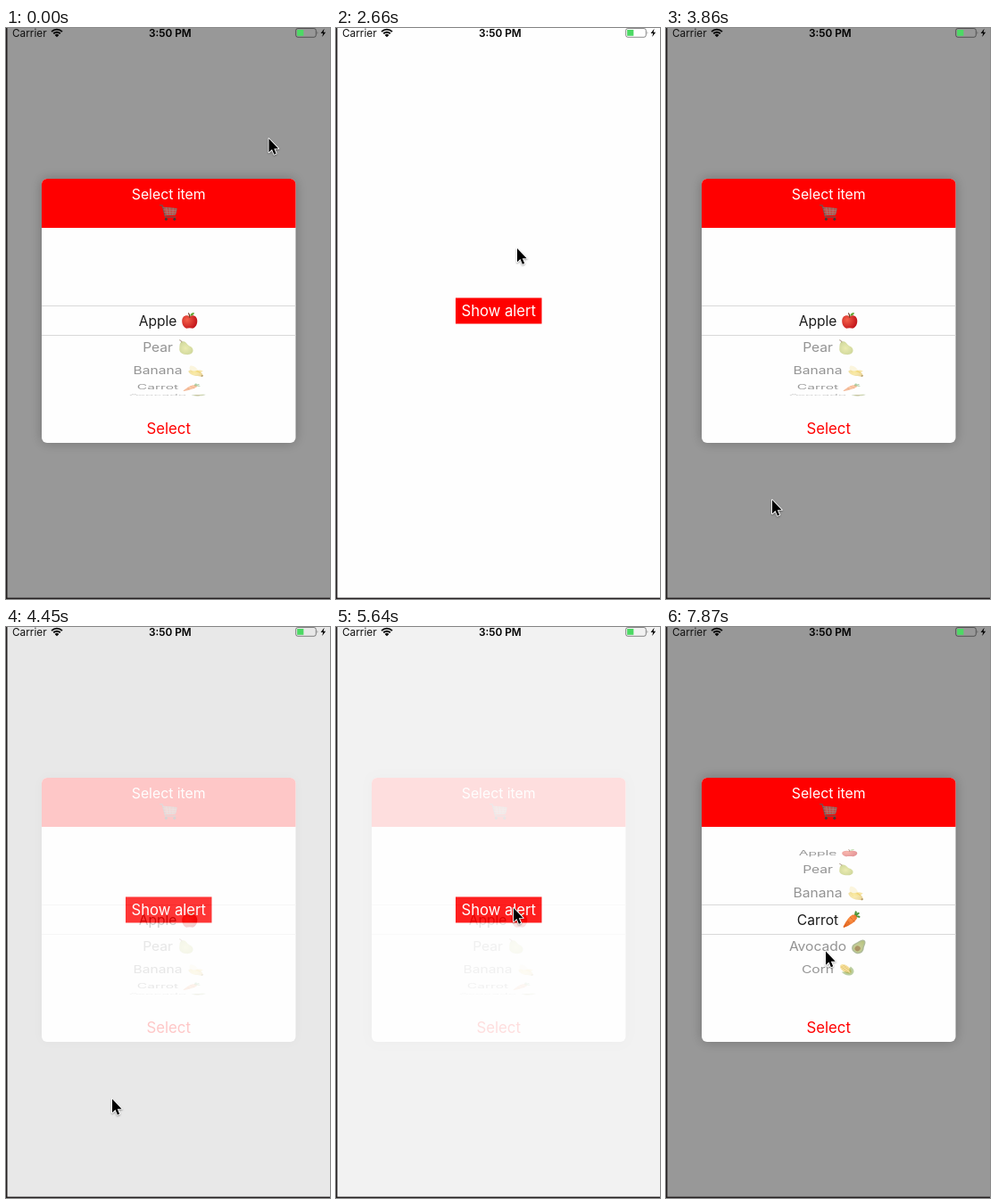
Animation of 363x640 px, one loop 8000 ms. Source, as an HTML page with a canvas:

```html
<!DOCTYPE html>
<html lang="en">
<head>
<meta charset="utf-8">
<title>Item picker alert</title>
<style>
  html, body { margin: 0; width: 100%; height: 100%; overflow: hidden; background: #fefefe; }
  canvas { display: block; width: 100%; height: 100%; }
</style>
</head>
<body>
<canvas id="stage"></canvas>
<script>
const W = 363, H = 640, LOOP = 8000, STEP = 148.5;
const CX = 182.2, WHEEL_Y = 328, RADIUS = 84, PITCH = 0.366;
const RED = '#ff0000';
const ratio = window.devicePixelRatio || 1;

function prepare(canvas) {
  canvas.width = Math.round(W * ratio);
  canvas.height = Math.round(H * ratio);
  const c = canvas.getContext('2d');
  c.scale(ratio, ratio);
  return c;
}
const stage = prepare(document.getElementById('stage'));
const layer = document.createElement('canvas');
const alertCtx = prepare(layer);

// Keys are [step, value, ...]; values between keys are linear.
const FADE = [[0, 1], [11, 1], [12, .87], [13, .45], [14, 0], [18, 0], [19, .1], [20, .5],
  [21, .905], [22, 1], [27, 1], [28, .87], [29, .53], [30, .21], [31, 0], [37, 0],
  [38, .12], [39, .52], [40, .9], [41, 1]];
const POINTER = [[0, 294, 123.5], [3, 277.5, 107.5], [15, 277.5, 107.5], [18, 165, 316],
  [21, 165, 316], [23, 134, 446], [26, 118.5, 528.5], [31, 118.5, 528.5], [35, 198.5, 305],
  [36, 198.5, 314.5], [42, 198.5, 314.5], [43, 179.5, 319], [50, 179, 223], [53, 178.5, 363]];
const SCROLL = [[0, 0], [43, 0], [50, 2.85], [51, 3]];

function valueAt(keys, k) {
  const i = keys.findIndex(key => key[0] > k);
  if (i < 0) return keys[keys.length - 1].slice(1);
  const a = keys[i - 1], b = keys[i];
  const p = (k - a[0]) / (b[0] - a[0]);
  return a.slice(1).map((v, n) => v + (b[n + 1] - v) * p);
}

function setFont(c, size, weight = 400) {
  c.font = `${weight} ${size}px Inter, "Open Sans", sans-serif`;
}

function label(c, text, x, y, size, color, align = 'center', weight = 400) {
  setFont(c, size, weight);
  c.fillStyle = color;
  c.textAlign = align;
  c.fillText(text, x, y);
}

function fill(c, d, color) {
  c.fillStyle = color;
  c.fill(new Path2D(d));
}

function line(c, d, color, width) {
  c.strokeStyle = color;
  c.lineWidth = width;
  c.lineCap = c.lineJoin = 'round';
  c.stroke(new Path2D(d));
}

function oval(c, x, y, rx, ry, turn, color) {
  c.fillStyle = color;
  c.beginPath();
  c.ellipse(x, y, rx, ry, turn, 0, 7);
  c.fill();
}

function glow(c, x, y, r, inner, outer) {
  const g = c.createRadialGradient(x, y, 0, x, y, r);
  g.addColorStop(0, inner);
  g.addColorStop(1, outer);
  return g;
}

// Small pictures, each about 20 units wide around 0,0.
const icons = {
  Apple(c) {
    fill(c, 'M0-4.5C3-7.5 9-6 9 .5C9 6 5 10 2.4 9Q0 8.2-2.4 9C-5 10-9 6-9 .5C-9-6-3-7.5 0-4.5Z',
      glow(c, -3, -1, 12, '#f4604a', '#c3161c'));
    line(c, 'M0-4Q0-7-1.2-8.6', '#6b3a20', 1.2);
    fill(c, 'M.4-5.6Q1-9.6 5.4-9.6Q5-5.6.4-5.6Z', '#64a636');
  },
  Pear(c) {
    fill(c, 'M-5-7C-2-9 1-6 2.5-3.5C4-1.5 9-1 8.7 4C8.4 8.5 4 9.6 0 9C-5 8.5-8 5-7.3 1C-7-2-7.5-5-5-7Z',
      glow(c, 0, 1, 11, '#d5d75a', '#92a526'));
    line(c, 'M-4.5-7Q-5.5-8.5-7-9.3', '#70502a', 1.3);
  },
  Banana(c) {
    fill(c, 'M-5.5-8C-1-9 4-3 4 3L-3 5C-6 0-8-4-5.5-8Z', '#f7eaba');
    fill(c, 'M-5-1Q-2 1 0 0Q3-1 6 2Q9 4 9.5 8L8 9.3C2 9.3-6 8-8 1Q-7-1-5-1Z',
      glow(c, -1, 3, 10, '#fae05f', '#d5a72a'));
    fill(c, 'M1 0Q6-2 9.5 1Q7 1.5 6 4Z', '#eec845');
    fill(c, 'M8 6.8L10 8L8.4 9.6L6.8 8.6Z', '#745526');
  },
  Carrot(c) {
    line(c, 'M4.5-4.5L5.5-9M4.5-4.5L8.5-7.5M4.5-4.5L9.3-3.4', '#4f963a', 2.3);
    fill(c, 'M1.6-5.8Q6.7-6.5 6.7-1.3Q3 5-8.8 9.5Q-9.8 9.4-9.2 8Q-4-3 1.6-5.8Z',
      glow(c, 0, -1, 11, '#ff9448', '#e2631d'));
    line(c, 'M-1-2.6L1-.8M-4 2.5L-2.5 4M2.2 1.2L3.6 2', '#bd5118', .7);
  },
  Avocado(c) {
    c.rotate(.65);
    fill(c, 'M0-10C4-10 4-4 6-1C9 4 6 9.5 0 9.5C-6 9.5-9 4-6-1C-4-4-4-10 0-10Z', '#56702b');
    fill(c, 'M0-8.5C2.6-8.5 2.8-3 4.7 0C7 4 4.6 8.1 0 8.1C-4.6 8.1-7 4-4.7 0C-2.8-3-2.6-8.5 0-8.5Z',
      glow(c, 0, 2, 10, '#eee9a0', '#bdcd61'));
    oval(c, 0, 3.2, 3.2, 3.4, 0, '#8b5230');
  },
  Corn(c) {
    c.rotate(-.7);
    oval(c, 0, -1.5, 4.7, 9, 0, '#edc33d');
    for (let y = -7; y < 5; y += 2.6) line(c, `M-3.3 ${y}H3.3`, '#c99726', .6);
    line(c, 'M-1.6-8V6M1.6-8V6', '#c99726', .5);
    fill(c, 'M-7-1Q-1 1 0 7Q1 1 7-1Q7.5 8 1 9.8H-1Q-7.5 8-7-1Z', '#719a3b');
  }
};
const items = Object.keys(icons);

function drawCart(c) {
  c.save();
  c.translate(CX, 206.3);
  fill(c, 'M-6.4-5.2L9-3.8L7.4 3L-4.2 3.4Z', 'rgba(150,125,115,.6)');
  line(c, 'M-9.6-7.8L-7-7.4L-3.6 5.6H7.8', '#675753', 1.2);
  line(c, 'M-6.4-5.2L9-3.8L7.4 3L-4.2 3.4', '#85736c', 1);
  line(c, 'M-5.7-2.5L8.5-1.6M-4.9.4L8 .7M-2.7-4.8L-1.1 3.2M1.2-4.5L1.7 3.1M5.1-4.2L4.6 3', '#a18e85', .6);
  oval(c, -2.8, 8, 1.5, 1.5, 0, '#3f3937');
  oval(c, 6.6, 8, 1.5, 1.5, 0, '#3f3937');
  c.restore();
}

function drawItems(c, offset, inBand) {
  items.forEach((name, i) => {
    const angle = (i - offset) * PITCH, squash = Math.cos(angle);
    if (Math.abs(angle) > 1.53) return;
    c.save();
    c.translate(CX, WHEEL_Y + RADIUS * Math.sin(angle));
    c.scale(1, squash);
    c.globalAlpha = inBand ? 1 : .47 * Math.min(1, .5 + squash);
    setFont(c, 15.6);
    const textWidth = c.measureText(name + ' ').width;
    const left = -(textWidth + 20) / 2;
    label(c, name, left, 5.7, 15.6, '#1c1c1c', 'left');
    c.translate(left + textWidth + 10, 0);
    c.scale(.95, .95);
    icons[name](c);
    c.restore();
  });
}

function clipped(c, rects, draw) {
  c.save();
  c.beginPath();
  rects.forEach(([y, h]) => c.rect(40, y, 285, h));
  c.clip();
  draw();
  c.restore();
}

function drawAlert(c, offset) {
  c.clearRect(0, 0, W, H);
  c.fillStyle = 'rgba(0,0,0,.4)';
  c.fillRect(0, 0, W, H);

  c.save();
  c.beginPath();
  c.roundRect(40, 169, 284.5, 296, 6);
  c.shadowColor = 'rgba(0,0,0,.25)';
  c.shadowBlur = 14 * ratio;
  c.fillStyle = '#fefefe';
  c.fill();
  c.shadowColor = 'transparent';
  c.clip();
  c.fillStyle = RED;
  c.fillRect(40, 169, 285, 55);
  c.restore();

  label(c, 'Select item', CX, 192.3, 15.8, '#fff');
  drawCart(c);

  clipped(c, [[224, 87], [345, 85]], () => drawItems(c, offset, false));
  clipped(c, [[311, 34]], () => drawItems(c, offset, true));
  c.fillStyle = '#d9d9d9';
  c.fillRect(40, 311, 284.5, 1);
  c.fillRect(40, 344, 284.5, 1);

  label(c, 'Select', CX, 455.2, 16.8, RED);
}

function drawStatus(c) {
  label(c, 'Carrier', 7, 9.8, 11.8, '#111', 'left');
  label(c, '3:50 PM', 183.8, 9.8, 11.8, '#000', 'center', 600);

  c.strokeStyle = c.fillStyle = '#000';
  c.lineCap = 'butt';
  c.lineWidth = 1.9;
  for (const r of [8.4, 5.3]) {
    c.beginPath();
    c.arc(57, 10, r, -Math.PI * .75, -Math.PI * .25);
    c.stroke();
  }
  c.beginPath();
  c.moveTo(57, 10.3);
  c.arc(57, 10.3, 3.3, -Math.PI * .75, -Math.PI * .25);
  c.fill();

  c.strokeStyle = 'rgba(0,0,0,.45)';
  c.lineWidth = 1;
  c.beginPath();
  c.roundRect(324.7, .5, 22.6, 9.8, 2.3);
  c.stroke();
  c.fillStyle = '#4cd964';
  c.fillRect(326.2, 2, 7.2, 6.8);
  fill(c, 'M348.6 3.6Q350.2 5.4 348.6 7.2Z', 'rgba(0,0,0,.5)');
  fill(c, 'M356.6.8L352.6 6H355.2L354.2 10L358.2 4.7H355.6Z', '#000');
}

function drawPointer(c, x, y) {
  c.save();
  c.translate(x, y);
  const arrow = new Path2D('M.5 .5V15.8L4 12.5L6.4 18.2L8.7 17.2L6.3 11.7H11.2Z');
  c.shadowColor = 'rgba(0,0,0,.35)';
  c.shadowBlur = 2 * ratio;
  c.shadowOffsetY = ratio;
  c.strokeStyle = '#fff';
  c.lineWidth = 1.8;
  c.lineJoin = 'round';
  c.stroke(arrow);
  c.shadowColor = 'transparent';
  c.fillStyle = '#000';
  c.fill(arrow);
  c.restore();
}

function render(time) {
  const k = Math.floor((time % LOOP + 9) / STEP);
  const [fade] = valueAt(FADE, k);
  const c = stage;

  c.fillStyle = '#fefefe';
  c.fillRect(0, 0, W, H);
  c.fillStyle = RED;
  c.fillRect(134, 302.5, 96.5, 29);
  label(c, 'Show alert', CX, 323, 16.6, '#fff');

  if (fade > 0) {
    drawAlert(alertCtx, valueAt(SCROLL, k)[0]);
    c.globalAlpha = fade;
    c.drawImage(layer, 0, 0, W, H);
    c.globalAlpha = 1;
  }

  drawStatus(c);
  c.fillStyle = '#231f20';
  c.fillRect(0, 0, 1.5, H);
  c.fillRect(0, 638.6, W, 1.4);
  drawPointer(c, ...valueAt(POINTER, k));
}

const start = performance.now();
function tick() {
  render(performance.now() - start);
  requestAnimationFrame(tick);
}
tick();
</script>
</body>
</html>
```
